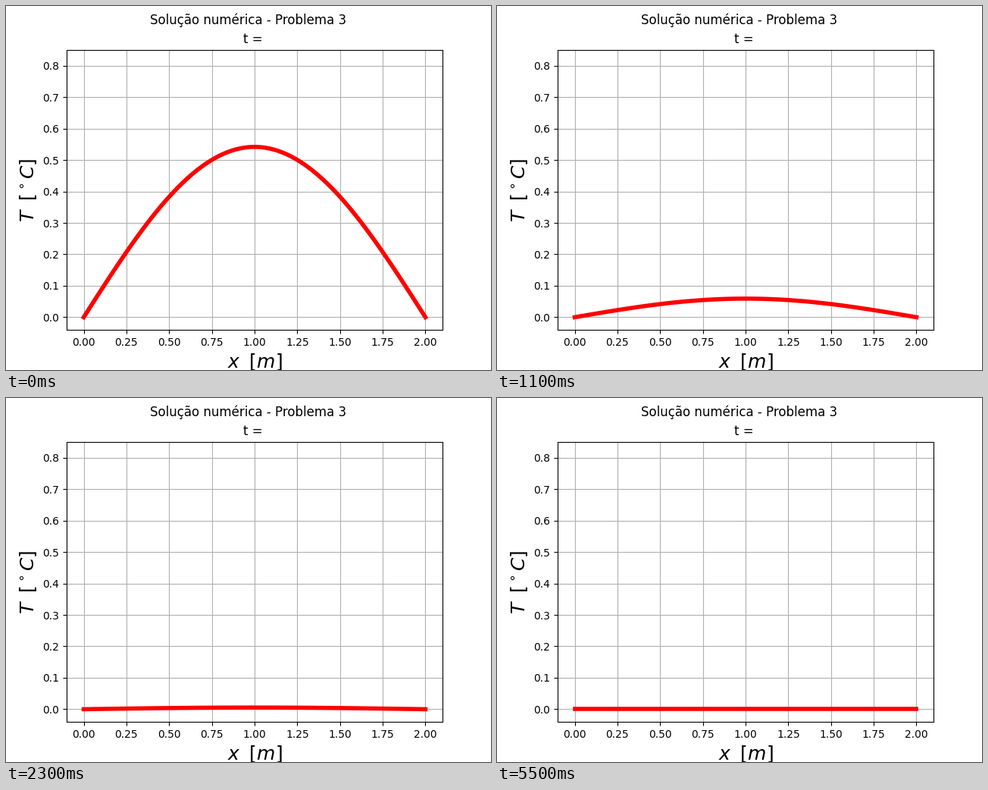
These frames come from a looping animation (640 px wide and 480 px high, 10 s). A matplotlib script:

```python
import numpy as np
import matplotlib.pyplot as plt
from matplotlib.animation import FuncAnimation

FRAMES = 100
INTERVAL = 100
LENGTH = 2.0
DT = 4 / 49
LEAD_STEPS = 2  # time steps already elapsed when the loop starts

x = np.linspace(0, LENGTH, 121)
start = 8 / np.pi**2 * np.sin(np.pi * x / LENGTH)


def temperature(step):
    """Heat equation with cold ends: the first mode decays exponentially."""
    return start * np.exp(-(np.pi / LENGTH) ** 2 * DT * step)


fig, ax = plt.subplots(figsize=(6.4, 4.8), dpi=100)
fig.suptitle("Solução numérica - Problema 3")
ax.set_title("t = ")
ax.set_xlabel(r"$x \;\; [m]$", fontsize=18)
ax.set_ylabel(r"$T \;\; [^\circ C]$", fontsize=18)
ax.grid(True)

# The starting profile sets the fixed axis limits.
line, = ax.plot(x, start, color="red", linewidth=4)
ax.set_xlim(ax.get_xlim())
ax.set_ylim(ax.get_ylim())


def draw(frame):
    line.set_ydata(temperature(frame + LEAD_STEPS))
    return line,


anim = FuncAnimation(fig, draw, frames=FRAMES, interval=INTERVAL, repeat=True)
plt.show()
```
